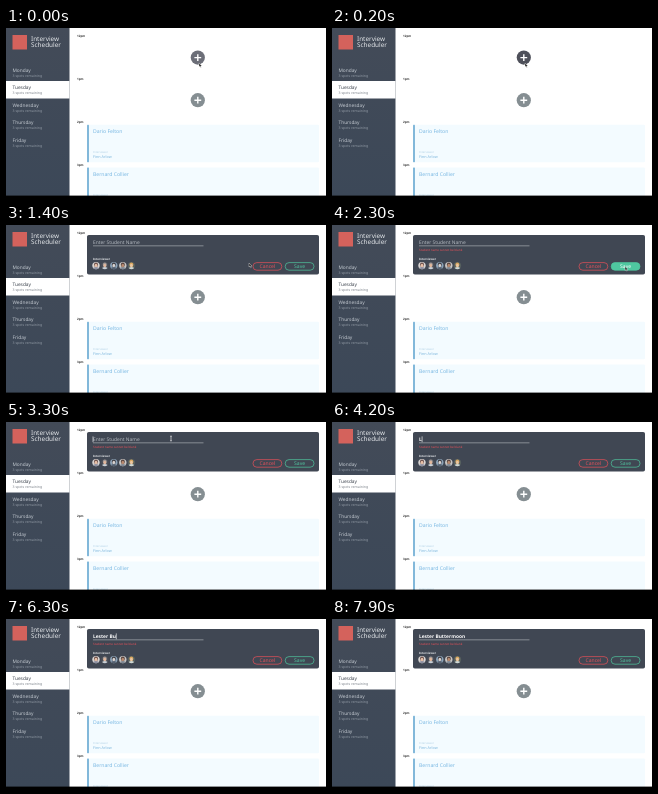
Write an HTML page that moves like this. It is 320 by 169 pixels and loops after 8000 ms.

```html
<!DOCTYPE html>
<html lang="en">
<head>
<meta charset="utf-8">
<title>Interview Scheduler</title>
<style>
  html, body { margin: 0; width: 100%; height: 100%; overflow: hidden; background: #fff; }
  svg { display: block; width: 100vw; height: 100vh; }
  text { font-family: "Noto Sans", "Open Sans", sans-serif; white-space: pre; text-rendering: geometricPrecision; }
</style>
</head>
<body>
<svg id="stage" viewBox="0 0 320 169">
  <defs>
    <linearGradient id="side" x2="0" y2="1">
      <stop offset="0" stop-color="#434b58"/>
      <stop offset="1" stop-color="#3c4858"/>
    </linearGradient>
  </defs>
  <rect width="320" height="169" fill="#fff"/>
  <g id="cards"></g>
  <g id="sidebar">
    <rect width="63.5" height="168" fill="url(#side)"/>
    <rect x="6.5" y="7" width="14.5" height="14.5" fill="#d4625c"/>
  </g>
  <g id="hours"></g>
  <g id="adds"></g>
  <g id="form">
    <rect x="81" y="10" width="232" height="39.5" rx="1.8" fill="#404753"/>
    <rect x="87" y="20.6" width="110.5" height=".6" fill="#b3b8be"/>
  </g>
  <rect y="167.6" width="320" height="1.4" fill="#000"/>
  <g id="pointer">
    <path id="arrow" d="M0 0V4L1 3.1 1.7 4.6 2.3 4.3 1.7 2.9H2.9Z" fill="#222" stroke="#fff" stroke-width=".35"/>
    <path id="beam" d="M-.9-2.3H.9M0-2.3V2.3M-.9 2.3H.9" fill="none" stroke="#fff" stroke-width=".6"/>
  </g>
</svg>
<script>
const LOOP = 8000, STEP = 100;
const NAME = "Lester Buttermoon";
const KEYS = [4100, 4500, 4900, 5100, 5300, 5400, 5500, 5900, 6100, 6400, 6500, 6700, 6800, 7000, 7200, 7300, 7400];
const PATH = [[1000, 193, 35], [1800, 293, 41], [2300, 293, 41.5], [2700, 272, 42], [3000, 165, 16.5]];
const RED = "#e8515a", GREEN = "#4fc7a0";

const $ = id => document.getElementById(id);

function add(parent, tag, attrs, content) {
  const el = document.createElementNS("http://www.w3.org/2000/svg", tag);
  for (const key in attrs) el.setAttribute(key, attrs[key]);
  if (content) el.textContent = content;
  return parent.appendChild(el);
}

function label(parent, x, y, size, fill, content, extra) {
  return add(parent, "text", { x, y, "font-size": size, fill, ...extra }, content);
}

const clamp = v => Math.max(0, Math.min(1, v));
const ramp = (t, from, to) => clamp((t - from) / (to - from));
const show = (el, on) => el.setAttribute("visibility", on ? "visible" : "hidden");

function buildSidebar() {
  const side = $("sidebar");
  label(side, 25, 13.2, 6.4, "#e4e7ea", "Interview");
  label(side, 25, 19.4, 6.4, "#e4e7ea", "Scheduler");
  add(side, "rect", { y: 53, width: 63.5, height: 17.5, fill: "#fff" });
  ["Monday", "Tuesday", "Wednesday", "Thursday", "Friday"].forEach((day, i) => {
    const y = 43.8 + i * 17.55, active = i === 1;
    label(side, 6.5, y, 4.8, active ? "#3f4650" : "#c3c9d0", day);
    label(side, 6.5, y + 4.8, 3.5, active ? "#7c828a" : "#929ba6", "3 spots remaining");
  });
}

function buildHours() {
  ["12pm", "1pm", "2pm", "3pm"].forEach((hour, i) =>
    label($("hours"), 71, 9.2 + i * 42.8, 3, "#333", hour, { "font-weight": 700 }));
}

function addCard(y, name, interviewer) {
  const g = $("cards");
  add(g, "rect", { x: 81, y, width: 232, height: 37.5, rx: 1.2, fill: "#f3fbff" });
  add(g, "rect", { x: 81, y, width: 2, height: 37.5, rx: .6, fill: "#82b8da" });
  label(g, 87, y + 8.4, 5.1, "#78b7e2", name);
  label(g, 87, y + 28.6, 2.8, "#b4d2e6", "Interviewer");
  label(g, 87, y + 33.2, 3.75, "#7db6dc", interviewer);
}

function addPlus(y, fill) {
  const g = add($("adds"), "g", { transform: `translate(191.8 ${y})` });
  const disc = add(g, "circle", { r: 7.1, fill });
  add(g, "path", { d: "M-3.4 0H3.4M0-3.4V3.4", stroke: "#fff", "stroke-width": 1.4 });
  return disc;
}

function addAvatar(x, back, hair, skin, shirt) {
  const g = add($("form"), "g", { transform: `translate(${x} 40.6)` });
  add(g, "circle", { r: 3.7, fill: back });
  add(g, "path", { d: "M-2.8 2.4Q0 .2 2.8 2.4Q0 5 -2.8 2.4Z", fill: shirt });
  add(g, "ellipse", { cy: -.8, rx: 2, ry: 2.2, fill: hair });
  add(g, "ellipse", { cy: -.1, rx: 1.35, ry: 1.7, fill: skin });
}

function addButton(x, color, content) {
  const box = add($("form"), "rect", {
    x, y: 37.6, width: 28.8, height: 7.6, rx: 3.8, fill: color, "fill-opacity": 0, stroke: color, "stroke-width": .7
  });
  const text = label($("form"), x + 14.4, 43.2, 5.05, color, content, { "text-anchor": "middle" });
  return { box, text };
}

buildSidebar();
buildHours();
addCard(96.7, "Dario Felton", "Finn Arlow");
addCard(139.5, "Bernard Collier", "Finn Arlow");
const firstPlus = addPlus(29.6, "#888f94");
addPlus(72.2, "#858e92");

const form = $("form");
const hint = label(form, 87, 19.2, 4.9, "#b4bac1", "Enter Student Name");
const typed = label(form, 87, 19.2, 4.85, "#fff", "", { "font-weight": 600 });
const caret = add(form, "rect", { y: 14.4, width: .6, height: 5.8, fill: "#fff" });
const error = label(form, 87, 26.4, 3, RED, "Student name cannot be blank");
label(form, 87, 34.6, 2.9, "#e0e3e6", "Interviewer", { "font-weight": 600 });
addAvatar(90, "#d8d4d2", "#6b4f4a", "#e8c0a8", "#8b8fa0");
addAvatar(98.8, "#4b4f58", "#a39a98", "#e2b79c", "#c9d0d6");
addAvatar(107.8, "#8ca3b8", "#3d3a40", "#d9d3d0", "#55606f");
addAvatar(116.8, "#c9c6c4", "#55433e", "#b98a70", "#7d8793");
addAvatar(125.4, "#56605f", "#d9a65c", "#eac7a4", "#cfd8d4");
addButton(247, RED, "Cancel");
const save = addButton(279.2, GREEN, "Save");

function pointerAt(t) {
  const next = PATH.findIndex(p => p[0] > t);
  if (next === 0) return PATH[0].slice(1);
  if (next < 0) return PATH[PATH.length - 1].slice(1);
  const [t0, x0, y0] = PATH[next - 1], [t1, x1, y1] = PATH[next];
  const u = ramp(t, t0, t1), k = u * u * (3 - 2 * u);
  return [x0 + (x1 - x0) * k, y0 + (y1 - y0) * k];
}

function caretOn(t, count) {
  if (t < 3300) return false;
  return count ? t - KEYS[count - 1] < 500 : t < 3900;
}

function draw(t) {
  const open = t >= 600;
  const count = KEYS.filter(k => k <= t).length;
  const shade = 108 - 30 * ramp(t, 0, 200);
  firstPlus.setAttribute("fill", `rgb(${shade},${shade + 2},${shade + 12})`);
  $("adds").firstChild.setAttribute("visibility", open ? "hidden" : "visible");
  form.setAttribute("display", open ? "inline" : "none");

  if (open) {
    const hover = Math.min(ramp(t, 1500, 1800), 1 - ramp(t, 2500, 2800));
    save.box.setAttribute("fill-opacity", hover);
    save.text.setAttribute("fill", hover > .5 ? "#fff" : GREEN);
    typed.textContent = NAME.slice(0, count);
    show(hint, !count);
    show(error, t >= 2000);
    show(caret, caretOn(t, count));
    caret.setAttribute("x", 87 + (count ? typed.getComputedTextLength() : -.3));
  }

  const [x, y] = pointerAt(t);
  const overInput = t >= 3000;
  $("pointer").setAttribute("transform", `translate(${x} ${y})`);
  show($("arrow"), !overInput);
  show($("beam"), overInput && t < 4200);
}

function tick(now) {
  draw(Math.floor((now % LOOP) / STEP) * STEP);
  requestAnimationFrame(tick);
}
draw(0);
requestAnimationFrame(tick);
</script>
</body>
</html>
```
